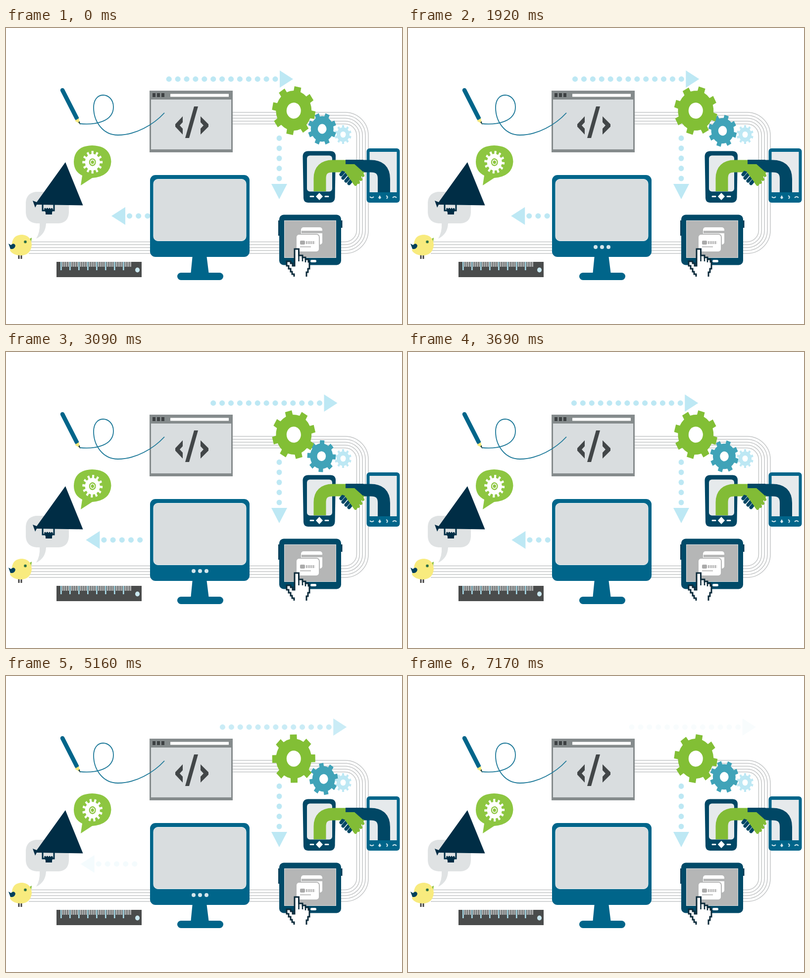
Recreate the animation shown at these times as an HTML page. Size 800 by 600 pixels, loop 7200 ms.

```html
<!DOCTYPE html>
<html lang="en">
<head>
<meta charset="utf-8">
<title>Digital workflow</title>
<style>
  html, body { margin: 0; width: 100%; height: 100%; overflow: hidden; background: #fff; }
  svg { display: block; width: 100vw; height: 100vh; }
</style>
</head>
<body>
<svg viewBox="0 0 800 600">
  <g id="rails" fill="none" stroke="#c4c6c7" stroke-width="1.5"></g>

  <!-- browser window -->
  <path d="M290 127H458V252H290Z" fill="#858b8c"/>
  <path d="M293 145H455V246H293Z" fill="#d9dddf"/>
  <path d="M296 132h6v8h-6zM305 132h6v8h-6zM314 132h6v8h-6z" fill="#3d4143"/>
  <path d="M332 133.500H450V139.500H332Z" fill="#fff"/>
  <path d="M357 179V191L351 197.500L357 204V216L342 200V195ZM393 179V191L399 197.500L393 204V216L409 200V195ZM380 159H388L370 223H362Z" fill="#424648"/>

  <!-- pencil and its line -->
  <path d="M149 194C180 197 217 190 217 160C217 144 206 136 196 136C184 136 177 147 177 161C177 190 196 217 226 217C262 217 298 196 320 172" fill="none" stroke="#1c7898" stroke-width="1.8"/>
  <path d="M114 126L143 183" stroke="#00658a" stroke-width="8.500" stroke-linecap="round"/>
  <path d="M139 188L147 183L150 195Z" fill="#f4e77c"/>
  <path d="M146 191L149 189L150 196Z" fill="#173c4c"/>

  <!-- gears -->
  <g id="tiny"></g>
  <g id="small"></g>
  <g id="big"></g>

  <!-- arrows -->
  <g id="right"></g>
  <g id="left"></g>
  <g id="down"></g>

  <!-- handheld devices and handshake -->
  <path d="M610 249.500H656Q666 250 666 260L664.500 344Q664 353.500 655 354H610Q601.500 353.500 601 345L599.500 260Q600 250 610 249.500Z" fill="#004765"/>
  <rect x="608" y="258.500" width="51" height="73" rx="6" fill="#e6eaec"/>
  <path d="M633 334L640 341.500L633 349L626 341.500Z" fill="#fff"/>
  <path d="M615 341.500H621M645 341.500H651" stroke="#fff" stroke-width="3" stroke-linecap="round"/>
  <rect x="728.500" y="244" width="67" height="110" rx="6" fill="#00658a"/>
  <rect x="734.500" y="251" width="55" height="82" fill="#e6eaec"/>
  <path d="M735 342q4 4 8 0M768 340q5 2 1 6M781 344q4-4 8 0" fill="none" stroke="#d6e8ee" stroke-width="2"/>
  <path d="M755 339l3 5-3 3-3-3z" fill="#d6e8ee"/>
  <path d="M634 331V305Q634 280 660 280H692" fill="none" stroke="#82bc36" stroke-width="25"/>
  <path d="M686 280H737Q763.500 280 763.500 306V333" fill="none" stroke="#004765" stroke-width="25"/>
  <path d="M682 291L677 297M687 297L681 304M693 303L687 310M698 309L693 315" stroke="#004765" stroke-width="7" stroke-linecap="round"/>
  <path d="M672 287L686 276H706L724 292L718 301L709 318L702 316L684 291Z" fill="#82bc36"/>
  <path d="M719 295L721 299M714 302L717 307M709 308L712 313M703 313L706 317" stroke="#82bc36" stroke-width="6" stroke-linecap="round"/>
  <path d="M686 267H722V292L704 276H690Q686 273 686 267Z" fill="#004765"/>

  <!-- tablet -->
  <path d="M550 390H556V421H550ZM674 390H679.500V405H674Z" fill="#003b55"/>
  <rect x="552" y="378.500" width="125" height="102" rx="9" fill="#004a68"/>
  <rect x="562.500" y="390.500" width="104" height="75" fill="#b5b6b6" stroke="#d9dcdd"/>
  <rect x="615" y="470" width="12" height="5" rx="2.500" fill="#fff"/>
  <rect x="596" y="404" width="43" height="35" rx="5" fill="#fff"/>
  <path d="M597 411H639V416H597Z" fill="#b5b6b6"/>
  <rect x="586" y="418" width="47" height="36" rx="6" fill="#fff" stroke="#b5b6b6" stroke-width="2"/>
  <rect x="594" y="431" width="10" height="8" rx="2" fill="#aaa"/>
  <path d="M606 435H624" stroke="#aaa" stroke-width="6" stroke-dasharray="2 1.500"/>
  <path d="M594 443.500H616" stroke="#bbb" stroke-width="2"/>
  <path d="M582 504V499H578V494H575V488H571V482H567V473H575V477H579V482H583V448H591.500V461H599V465H605V469H611V474H613V488H610V495H607V504" fill="#fff" stroke="#0d2b3b" stroke-width="3"/>
  <path d="M591.500 461V473M599 465V473M605 469V475" stroke="#0d2b3b" stroke-width="2.500"/>

  <!-- monitor -->
  <path d="M377 460H405L410 500H373Z" fill="#00658a"/>
  <rect x="291" y="298" width="201" height="166" rx="11" fill="#00658a"/>
  <rect x="298" y="306.500" width="187" height="125" rx="9" fill="#d9dddf" stroke="#e6eff2"/>
  <rect x="346" y="496" width="93" height="15" rx="7.500" fill="#00658a"/>
  <g id="dots" fill="#d5e6ec">
    <circle cx="379" cy="444" r="4"/><circle cx="392" cy="444" r="4"/><circle cx="405" cy="444" r="4"/>
  </g>

  <!-- ruler -->
  <path d="M102 474H274V505H102Z" fill="#4a4c4c"/>
  <g id="ticks"></g>
  <ellipse cx="265.500" cy="490.500" rx="4.500" ry="5" fill="#c9e7ef"/>

  <!-- megaphone -->
  <path d="M60 332H107Q127 334 127 354V374Q126 395 106 396H81Q80 418 61 427Q69 414 68 396H62Q41 394 40 374V354Q41 335 60 332Z" fill="#dfe2e3"/>
  <path d="M120 272L155.500 359.500L62 358L59 364L54 350L62 353Z" fill="#002d45"/>
  <path d="M74 358V370H97V358" fill="none" stroke="#002d45" stroke-width="3"/>
  <path d="M77 367q2-5 4 0q2-5 5 0q2-5 4 0q2-4 5 0l-2 7v4H80v-4z" fill="#002d45"/>

  <!-- speech bubble -->
  <path d="M151 319L154 299Q137 291 137 271Q138 239 174 238Q211 239 212.500 271Q211 301 174 304Z" fill="#8dc641"/>
  <g id="badge"></g>

  <!-- bird -->
  <path d="M26 457V468M31 457V468" stroke="#444" stroke-width="3"/>
  <path d="M45 429L52 425L51 433Z" fill="#82bc36"/>
  <path d="M12 437Q14 419 33 419Q51 421 52 440Q50 460 31 461Q14 461 8 451Z" fill="#f8eb7e"/>
  <path d="M5 437L10 440Q16 434 19 441Q18 449 9 448Z" fill="#00405c"/>
  <circle cx="39" cy="433.500" r="3" fill="#4e8a44"/>
  <circle cx="39" cy="433.500" r="1.200" fill="#00405c"/>
</svg>
<script>
  const LOOP = 7200, STEP = 30, SKY = '#bde8f4';
  const STRETCH = 1.125; // wheels are taller than wide
  const $ = id => document.getElementById(id);
  const range = n => [...Array(n).keys()];

  function gear(id, teeth, outer, inner, hole, color, holeColor = '#fff') {
    const pitch = 2 * Math.PI / teeth, points = [];
    for (const i of range(teeth))
      for (const [r, a] of [[inner, -.25], [outer, -.2], [outer, .2], [inner, .25], [inner, .5]])
        points.push([r * Math.sin((i + a) * pitch), -r * Math.cos((i + a) * pitch)].map(v => v.toFixed(2)));
    $(id).innerHTML = `<polygon points="${points.join(' ')}" fill="${color}"/><circle r="${hole}" fill="${holeColor}"/>`;
  }

  // Points along +x with its tip at the origin
  function arrow(id, count, first, gap, length, half) {
    const dots = range(count).map(i => `<ellipse cx="${-first - i * gap}" rx="5.600" ry="5.400"/>`);
    $(id).innerHTML = `<path d="M0 0L${-length} ${-half}V${half}Z"/>` + dots.join('');
    $(id).setAttribute('fill', SKY);
  }

  function place(id, x, y, angle, scaleY = 1) {
    $(id).setAttribute('transform', `translate(${x} ${y}) scale(1 ${scaleY}) rotate(${angle})`);
  }

  const fade = (t, from, to) => Math.max(0, Math.min(1, (to - t) / (to - from)));

  $('rails').innerHTML = range(5).map(i => {
    const d = i * 5.9, r = 47 - d;
    return `<path d="M455 ${171 + d}H685a${r} ${r} 0 0 1 ${r} ${r}V410a${r} ${r} 0 0 1 ${-r} ${r}H46"/>`;
  }).join('');

  $('ticks').innerHTML = range(40).map(i => i % 5
    ? `<rect x="${110.5 + i * 3.6}" y="474" width="1.700" height="10" fill="#e4e7e8"/>`
    : `<rect x="${110 + i * 3.6}" y="474" width="2.600" height="17" fill="#a9dcea"/>`).join('');

  gear('big', 8, 44, 36, 14.5, '#82bf35');
  gear('small', 8, 29, 23, 8.8, '#40a3b8');
  gear('tiny', 10, 17, 13, 5.5, SKY);
  gear('badge', 12, 20.5, 15, 7, '#fff', '#8dc641');
  $('badge').innerHTML += '<circle r="4.800" fill="#fff"/><circle r="3.200" fill="#8dc641"/>';
  arrow('right', 13, 36, 17.9, 27, 17.5);
  arrow('left', 5, 36.5, 18.2, 28, 18);
  arrow('down', 5, 42, 20.4, 31, 16);
  place('down', 552, 347, 90);
  place('tiny', 681, 216, 0, STRETCH);

  function draw(now) {
    const t = Math.floor(now % LOOP / STEP) * STEP;
    const turn = t / LOOP * 360, rad = turn * Math.PI / 180;
    const slide = t % 1800, blink = t % 3600;

    place('big', 581.3, 167.5, 11 + turn, STRETCH);
    // This wheel sits off its axle, so it wobbles as it turns
    place('small', 638.7 - 3.2 * Math.sin(rad), 208 - 3.5 * Math.cos(rad), 22.5 - turn, STRETCH);
    place('badge', 174.7, 272, turn, STRETCH);

    place('right', 580 + slide * .0694, 103.5, 0);
    $('right').style.opacity = fade(slide, 1500, 1800);
    place('left', 213 - slide * .04, 381, 180);
    $('left').style.opacity = fade(slide, 1350, 1600);

    const shown = blink < 3500 ? Math.floor(blink / 320) : 0;
    [...$('dots').children].forEach((dot, i) => dot.style.opacity = i < shown ? 1 : 0);
  }

  function tick() {
    draw(performance.now());
    requestAnimationFrame(tick);
  }
  tick();
</script>
</body>
</html>
```
